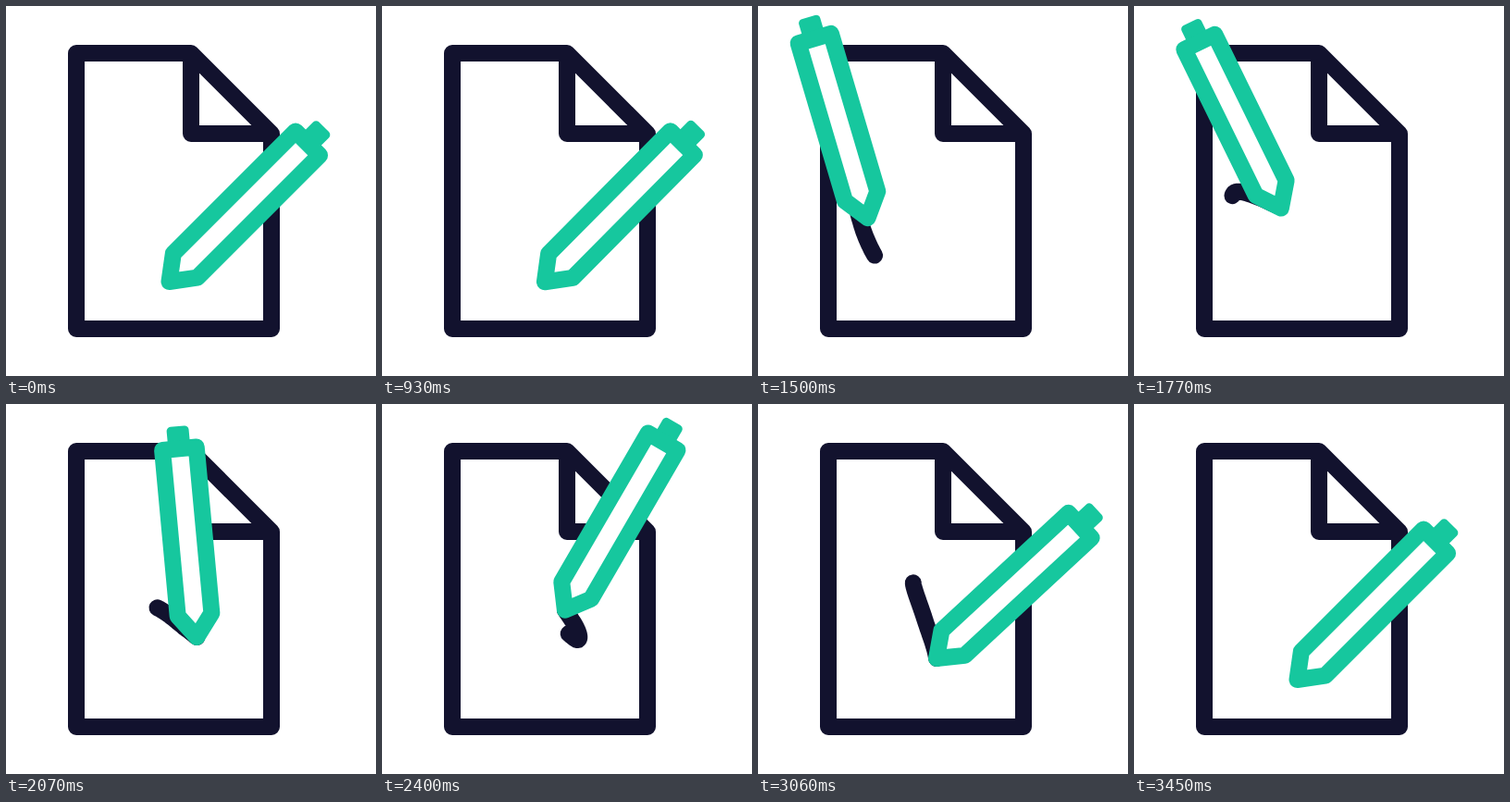
These frames come from a looping animation (400 by 400 pixels, 3480 ms). An HTML page:

```html
<!DOCTYPE html>
<html lang="en">
<head>
<meta charset="utf-8">
<title>Pen writing on a page</title>
<style>
  html, body { margin: 0; width: 100%; height: 100%; overflow: hidden; background: #fff; }
  svg { display: block; width: 100vw; height: 100vh; }
  path { fill: none; stroke-width: 18; stroke-linecap: round; stroke-linejoin: round; }
  .dark { stroke: #12122e; }
  #body { fill: #fff; stroke: #16c79e; }
  #cap { fill: #16c79e; }
</style>
</head>
<body>
<svg viewBox="0 0 400 400">
  <path class="dark" d="M76 51H200L287 138V349H76ZM200 51V138H287"/>
  <path class="dark" id="ink"/>
  <g id="pen">
    <rect id="cap" x="-12" width="24" height="34" rx="4.5"/>
    <path id="body"/>
  </g>
</svg>
<script>
const LOOP = 3480, STEP = 30, START = 900, BEAT = 180;
const [ink, pen, cap, body] = ["ink", "pen", "cap", "body"].map(id => document.getElementById(id));

// Where the tip is on each beat; the ink swings wider round one bend.
const route = [
  [176.5, 298], [162, 299], [133, 280], [112, 237], [142, 221],
  [163, 220], [196, 244], [212, 255], [208, 238], [174, 191],
  [168, 195], [180, 232], [193, 275], [186, 294], [176.5, 298]
];
const stroke = route.with(4, [110, 201]);

const clamp = (x, max) => Math.min(Math.max(x, 0), max);
const ease = (t, from, to) => (1 - Math.cos(Math.PI * clamp((t - from) / (to - from), 1))) / 2;

// Catmull-Rom curve through evenly timed points, mirrored at both ends.
function along(points, t) {
  const last = points.length - 1;
  const pos = clamp((t - START) / BEAT, last);
  const i = Math.min(Math.floor(pos), last - 1), u = pos - i;
  const [a, b, c, d] = [i - 1, i, i + 1, i + 2].map(k => points[last - Math.abs(last - Math.abs(k))]);
  return [0, 1].map(n => b[n] + u / 2 * (c[n] - a[n]
    + u * (2 * a[n] - 5 * b[n] + 4 * c[n] - d[n] + u * (3 * (b[n] - c[n]) + d[n] - a[n]))));
}

function inkPath(from, to) {
  if (to - from < 60) return "";
  const n = Math.ceil((to - from) / 8);
  return "M" + Array.from({ length: n + 1 }, (_, i) =>
    along(stroke, from + (to - from) * i / n).map(v => v.toFixed(2)).join(" ")).join("L");
}

function draw(t) {
  const lean = ease(t, START, 1700) - ease(t, 1700, 2700);
  const sway = ease(t, 2400, 2900) - ease(t, 2900, 3360);
  const angle = 45 - 72 * lean + 3 * sway;
  const length = 1 - 0.055 * Math.max(lean, 0) ** 1.5;
  const lag = 190 + 185 * ease(t, 1800, 2400) - 375 * ease(t, 3060, 3400);

  body.setAttribute("d", `M0 0L-18.4 -24.5V${-211.5 * length}H18.4V-24.5Z`);
  cap.setAttribute("y", -236.5 * length);
  pen.setAttribute("transform", `translate(${along(route, t)}) rotate(${angle})`);
  ink.setAttribute("d", inkPath(Math.max(t - lag, START), t));
}

const begin = performance.now();
function frame() {
  const t = (performance.now() - begin) % LOOP;
  draw(Math.floor(t / STEP) * STEP);
  requestAnimationFrame(frame);
}
frame();
</script>
</body>
</html>
```
